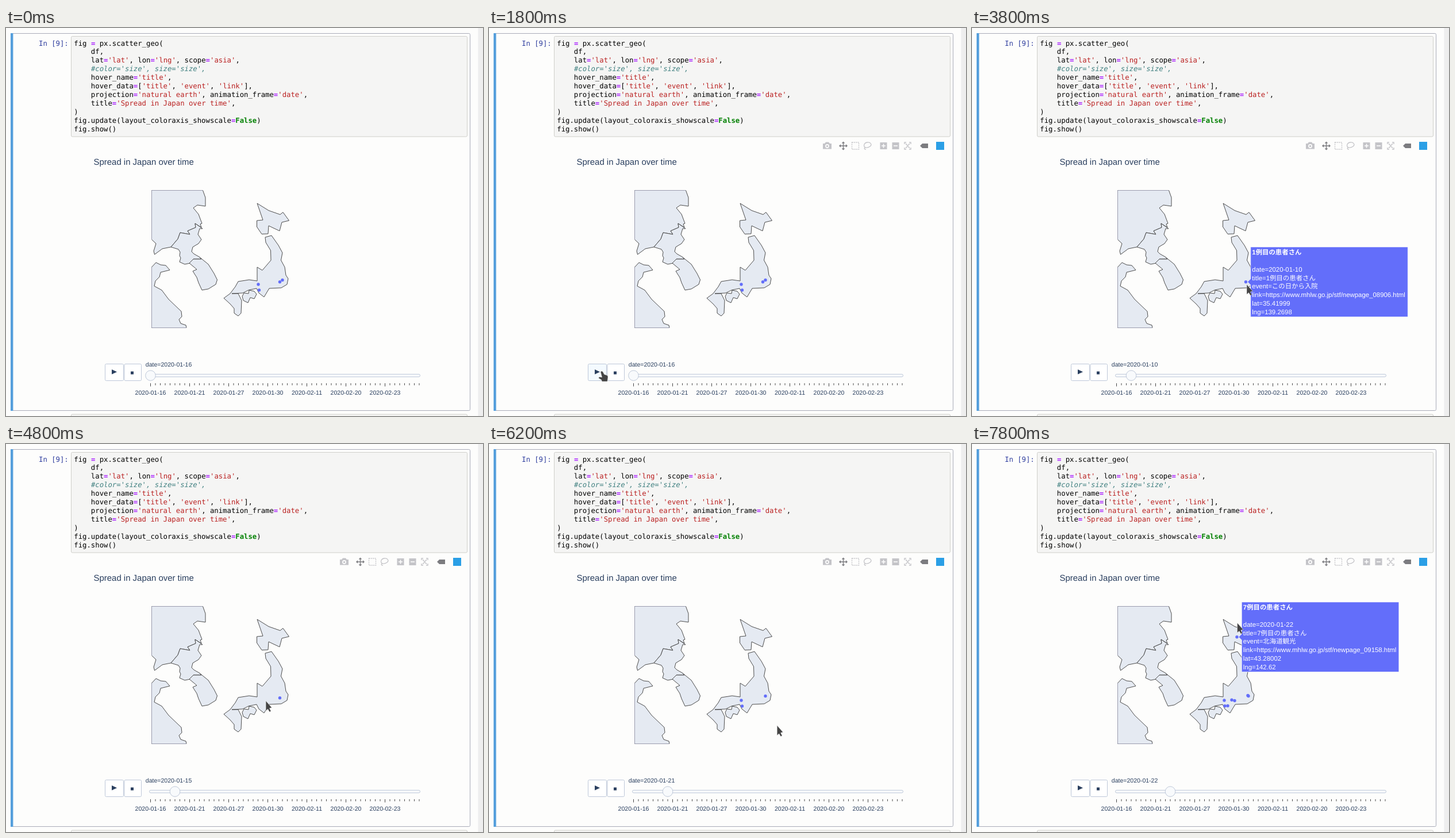
These frames come from a looping animation (830 px wide and 675 px high, 8 s). An HTML page:

```html
<!DOCTYPE html>
<html lang="en">
<head>
<meta charset="utf-8">
<style>
  html, body { margin: 0; width: 100%; height: 100%; overflow: hidden; background: #fdfdfc; }
  svg { position: absolute; left: 0; top: 0; }
  svg text, pre { text-rendering: geometricPrecision; }
  svg text { font-family: 'Liberation Sans', 'Noto Sans CJK JP', 'Noto Sans CJK', sans-serif; }
  pre { position: absolute; top: 19.5px; margin: 0; font: 12.29px/14.93px 'DejaVu Sans Mono', monospace; color: #000; }
  #prompt { left: 57px; color: #303f9f; }
  #code { left: 118.3px; }
  pre b { color: #a2f; }
  pre s { color: #ba2121; text-decoration: none; }
  pre i { color: #408080; }
  pre b.word { color: #008000; }
  .land path { fill: #e5eaf2; stroke: #444; stroke-width: .95; stroke-linejoin: round; }
  .control { fill: #fff; stroke: #bec8d9; }
  .plot-text { fill: #2a3f5f; font-size: 10.54px; }
</style>
</head>
<body>
<svg width="830" height="675" viewBox="0 0 830 675">
  <rect x="821.500" width="9" height="675" fill="#eee"/>
  <rect x="8.500" y="9.500" width="799" height="656" rx="2" fill="none" stroke="#a9abb8"/>
  <rect x="8" y="9" width="4.400" height="657" fill="#559fdc"/>
  <rect x="113.500" y="14.500" width="689" height="174.500" rx="2" fill="#f5f5f4" stroke="#cfcfca"/>
  <rect x="113.500" y="672" width="689" height="20" rx="2" fill="#f5f5f4" stroke="#cfcfca"/>

  <text x="152.600" y="238" font-size="14.930" fill="#2a3f5f">Spread in Japan over time</text>

  <g class="land">
    <path d="M253.500 282.500H342.500L347 295V310L333 308L326 313L335 324L341 340L338 341L340 347L329 340L330 347L316 353L320 359L303 356L299 367L287 381L272 384L258.500 394L257 388L261 375L253.500 368Z"/>
    <path d="M329 340L342 349L337 349L334 359L340 368L335 375L325 381L323 389L327 393L336 398L340 402L326 402L321 409L311 411L302 407L304 400L302 396L303 390L300 385L287 381L299 367L303 356L320 359L316 353L330 347Z"/>
    <path d="M336 398L352 411L362 427L367.500 438L365 446L352 454L341 456L335 443L332 434L325 423L332 420L319 409L326 402L340 402Z"/>
    <path d="M253.500 416L261 408L269 412L278 413L285 421L269 425L267 433L260 440L258 449L271 456L283 472L305 493L306 502L301 507L304 514L313 517L314 521.500H253.500Z"/>
    <path d="M437 305L457 317.500L477 324.500L482 320.500L492.500 335L480 338L476 353L457 344L456 358L445 358.500L436.500 346V335L447 334Z"/>
    <path d="M451 364L462 361L474 378L481 391L478.500 404L485 416L487 430L491 436L489 446L479 452L458 453L449 468L440 461L436 453L422 456L412 461L393 462L404 462L410 474L409 496L404 501L397 496V488L390 480L379 470L390 462L399 450L404 441L423 438L437 440V416L446 421.500L461 404L460.500 387L452 373Z"/>
    <path d="M411 467L414 461L422 462L423 456L432 458L436 463L432 471L425 469L421 478L413 474Z"/>
  </g>
  <path d="M342.500 282.500H253.500V368M253.500 416V521.500H314" fill="none" stroke="#9a9cae"/>
  <g id="dots" fill="#636efa"></g>

  <g id="toolbar" fill="none" stroke="#c4c4c8" stroke-width="1.6">
    <path d="M581 201h3l2-2.500h5l2 2.500h3v9.500h-15z" fill="#c4c4c8" stroke="none"/>
    <circle cx="588.500" cy="205.500" r="2.600" stroke="#fff"/>
    <path d="M610 205h13M616.500 198.500v13M612 203l-2 2 2 2M621 203l2 2-2 2M614.500 200.500l2-2 2 2M614.500 209.500l2 2 2-2" stroke="#7c7c80" stroke-width="1.400"/>
    <rect x="631.500" y="199" width="12" height="12" stroke-dasharray="2 1.300" stroke-width="1.300"/>
    <path d="M655 208c-4-2-3-8 3-9s9 4 5 7-7 2-8 2c-3 0-2 4 1 3" stroke-width="1.300"/>
    <path d="M680.500 199h12v12h-12zM701.500 199h12v12h-12z" fill="#c4c4c8" stroke="none"/>
    <path d="M683 205h7M686.500 201.500v7M704 205h7" stroke="#fff"/>
    <path d="M723 202v-3h3M731 199h3v3M734 208v3h-3M726 211h-3v-3M725 201l7 8M732 201l-7 8" stroke-width="1.400"/>
    <path d="M750 205l4-4h10v8h-10z" fill="#7c7c80" stroke="none"/>
    <rect x="778" y="198" width="14" height="14" fill="#2b9fe6" stroke="none"/>
  </g>

  <rect id="play" class="control" x="172.500" y="584.500" width="32" height="29" rx="2"/>
  <rect class="control" x="206" y="584.500" width="29.500" height="29" rx="2"/>
  <path d="M184 594l9 4.200-9 4.200zM217 597.500h5v5h-5z" fill="#2a3f5f"/>
  <text id="date" class="plot-text" x="242.800" y="589"></text>
  <rect class="control" x="249.500" y="602.300" width="471" height="4.600" rx="2.300" style="fill:#f8fafc"/>
  <g id="ticks"></g>
  <circle id="knob" class="control" cy="604.600" r="8.800" style="fill:#f8fafc"/>

  <g id="hover"></g>
  <path id="arrow" d="M0 0V17.500L3.500 14.500L6.500 19.500L9 18L6.500 13L10.500 12Z" fill="#444" stroke="#fff" stroke-width=".5"/>
  <path id="hand" d="M-3 0Q0-2.500 2 1.500L3.500 4.500L8 6Q10.500 7 10 10L9 17H-.500L-1.500 14L-6 11.500Q-7 8.500-4 9L-.500 9.500Z" fill="#444" stroke="#fff" stroke-width=".5"/>
</svg>
<pre id="prompt">In [9]:</pre>
<pre id="code">fig <b>=</b> px.scatter_geo(
    df,
    lat<b>=</b><s>'lat'</s>, lon<b>=</b><s>'lng'</s>, scope<b>=</b><s>'asia'</s>,
    <i>#color='size', size='size',</i>
    hover_name<b>=</b><s>'title'</s>,
    hover_data<b>=</b>[<s>'title'</s>, <s>'event'</s>, <s>'link'</s>],
    projection<b>=</b><s>'natural earth'</s>, animation_frame<b>=</b><s>'date'</s>,
    title<b>=</b><s>'Spread in Japan over time'</s>,
)
fig.update(layout_coloraxis_showscale<b>=</b><b class="word">False</b>)
fig.show()</pre>
<script>
const $ = id => document.getElementById(id);
const LOOP = 8000, HOLD = 200, TICK_X = 251.5, TICK_GAP = 8.5;
const PLAY_START = 2560, STEP = 508, REDRAW_DELAY = 100;

const kanto = [476.5, 441.7], tokyo = [481, 438.5], osaka = [439, 446], nara = [440.5, 456], hokkaido = [461, 335.7];
const nagoya = [452, 449.7];
const steps = [
  ['16', [osaka, nara, kanto, tokyo]],
  ['03', [kanto]],
  ['06', [kanto]],
  ['10', [kanto]],
  ['14', [kanto, tokyo]],
  ['15', [kanto]],
  ['25', [osaka, [449.5, 451], nagoya]],
  ['20', [osaka, nara, tokyo]],
  ['21', [hokkaido, [440, 447.5], [439.5, 455], [480, 437.5], [484, 438.8]]],
  ['23', [osaka, nara, tokyo]],
  ['24', [osaka, nara, tokyo]],
  ['22', [hokkaido, osaka, [452, 445.3], [457, 446.5], [440, 455.8], [445, 455.5], [480, 437.5], tokyo]],
];
const hovers = {
  3: { at: kanto, patient: 1, event: 'この日から入院', page: '08906', lat: '35.41999', lng: '139.2698' },
  6: { at: nagoya, patient: 10, event: '1/26まで発熱', page: '09236', lat: '34.85866', lng: '136.8115' },
  11: { at: hokkaido, patient: 7, event: '北海道観光', page: '09158', lat: '43.28002', lng: '142.62' },
};
// Pointer stops: time, x, y
const pointer = [
  [600, 420, 560], [1400, 197, 598], [2200, 197, 598], [2600, 264, 554], [3600, 478, 446],
  [4200, 478, 446], [5200, 438, 447], [5600, 438, 447], [6600, 535.5, 512.5], [7800, 461.5, 311],
];

let ticks = '';
for (let i = 0; i <= 55; i++) {
  const x = TICK_X + i * TICK_GAP;
  ticks += `<path d="M${x} 618v${i % 8 ? 3.5 : 5.5}" stroke="#333" stroke-width=".9"/>`;
}
['01-16', '01-21', '01-27', '01-30', '02-11', '02-20', '02-23'].forEach((day, i) => {
  ticks += `<text class="plot-text" x="${TICK_X + i * 8 * TICK_GAP}" y="638" text-anchor="middle">2020-${day}</text>`;
});
$('ticks').innerHTML = ticks;

const stepAt = t => Math.max(0, Math.min(steps.length - 1, 1 + Math.floor((t - PLAY_START) / STEP)));

function hoverLabel(index) {
  const h = hovers[index];
  if (!h) return '';
  const [px, py] = h.at, left = px + 8.3, top = py - 60.7;
  const title = `${h.patient}例目の患者さん`;
  const lines = [title, '', `date=2020-01-${steps[index][0]}`, `title=${title}`, `event=${h.event}`,
    `link=https://www.mhlw.go.jp/stf/newpage_${h.page}.html`, `lat=${h.lat}`, `lng=${h.lng}`];
  const text = lines.map((line, i) =>
    `<text x="${left + 2.5}" y="${top + 13 + i * 14.84}" ${i ? '' : 'font-weight="bold"'}>${line}</text>`).join('');
  return `<path d="M${px + 3} ${py}l5.300 -5.300V${top}h273.500v121.500H${left}V${py + 5.3}Z" fill="#636efa" stroke="#fff" stroke-width=".6"/>
    <g font-size="11.41" fill="#fff">${text}</g>`;
}

function pointerAt(t) {
  const next = pointer.findIndex(p => p[0] > t);
  if (next < 0) return pointer[pointer.length - 1].slice(1);
  const [t0, x0, y0] = pointer[Math.max(0, next - 1)], [t1, x1, y1] = pointer[next];
  const u = t1 > t0 ? (t - t0) / (t1 - t0) : 0, ease = u * u * (3 - 2 * u);
  return [x0 + (x1 - x0) * ease, y0 + (y1 - y0) * ease];
}

function draw(t) {
  const shown = stepAt(t - REDRAW_DELAY);
  $('date').textContent = `date=2020-01-${steps[stepAt(t)][0]}`;
  $('knob').setAttribute('cx', TICK_X + shown * TICK_GAP);
  $('dots').innerHTML = steps[shown][1].map(([x, y]) => `<circle cx="${x}" cy="${y}" r="2.700"/>`).join('');
  $('hover').innerHTML = hoverLabel(shown);

  const inside = t >= pointer[0][0], [x, y] = pointerAt(t);
  const onPlay = inside && x < 204 && y > 584;
  $('toolbar').style.display = inside ? '' : 'none';
  $('play').style.fill = onPlay ? '#f4faff' : '';
  for (const [id, visible] of [['arrow', inside && !onPlay], ['hand', onPlay]]) {
    $(id).style.display = visible ? '' : 'none';
    $(id).setAttribute('transform', `translate(${x} ${y})`);
  }
}

let last = -1;
function tick() {
  const t = Math.floor(performance.now() % LOOP / HOLD) * HOLD;
  if (t !== last) draw(last = t);
  requestAnimationFrame(tick);
}
tick();
</script>
</body>
</html>
```
